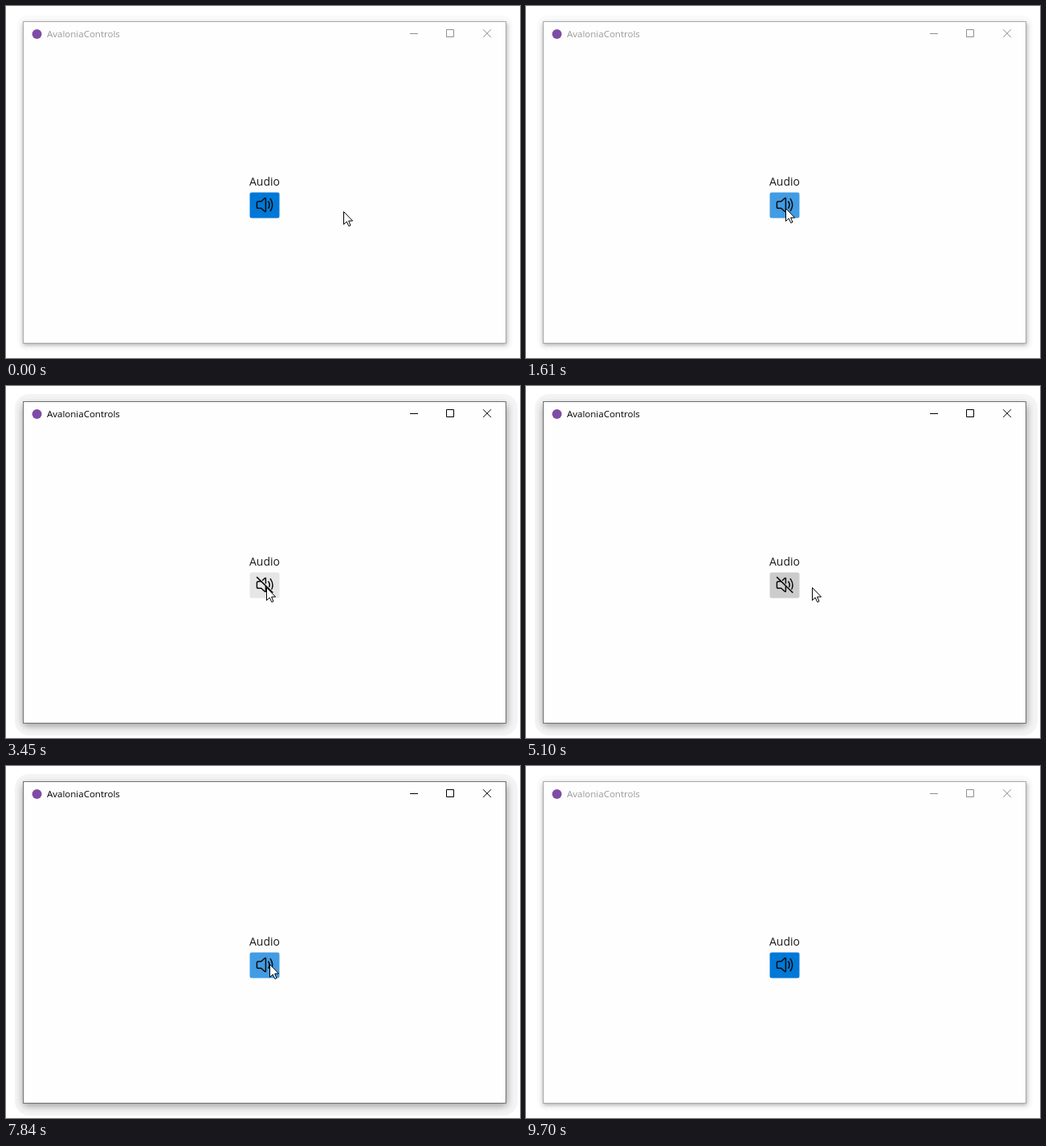
An HTML page that plays this animation: 640x439 px, repeating every 9810 ms.

```html
<!DOCTYPE html>
<html lang="en">
<head>
<meta charset="utf-8">
<title>AvaloniaControls</title>
<style>
  html, body { margin: 0; width: 100%; height: 100%; overflow: hidden; background: #fff; }
  svg { display: block; width: 100%; height: 100%; }
  text { font-family: "Open Sans", "Noto Sans", sans-serif; }
  .line { fill: none; stroke: #0a0a0a; stroke-width: 1.5; stroke-linecap: round; stroke-linejoin: round; }
</style>
</head>
<body>
<svg viewBox="0 0 640 439">
  <defs>
    <filter id="soft" x="-10%" y="-10%" width="120%" height="120%"><feGaussianBlur stdDeviation="2.5"/></filter>
    <filter id="deep" x="-10%" y="-10%" width="120%" height="120%"><feGaussianBlur stdDeviation="5"/></filter>
  </defs>
  <rect width="640" height="439" fill="#fff"/>

  <g id="idleShadow">
    <rect x="14" y="12" width="617" height="418" rx="12" fill="#fafafa"/>
    <rect x="21" y="21" width="603" height="402" rx="3" fill="#000" opacity=".3" filter="url(#soft)"/>
  </g>
  <g id="activeShadow">
    <rect x="11" y="10" width="626" height="426" rx="18" fill="#f4f4f4"/>
    <rect x="21" y="23" width="603" height="401" rx="4" fill="#000" opacity=".36" filter="url(#deep)"/>
  </g>
  <rect id="frame" x="21.5" y="19.5" width="601" height="401" fill="#fefefe"/>

  <circle cx="38.5" cy="35" r="6" fill="#7e4ca5"/>
  <text id="caption" x="51" y="39" font-size="11.5">AvaloniaControls</text>
  <path id="controls" fill="none" d="M503 34.5h10M548.5 29.5h9v9h-9zM594 29.2l10 10M604 29.2l-10 10"/>

  <text x="303" y="224" font-size="14" fill="#1c1c1c">Audio</text>
  <g id="button">
    <rect id="face" x="303.5" y="232.6" width="37" height="32" rx="2.5"/>
    <path id="iconOn" class="line" d="M323.4 240.4Q323.4 238.9 322.2 239.8L317.8 243.7H314.3Q312.4 243.7 312.4 245.6V250.4Q312.4 252.3 314.3 252.3H317.8L322.2 256.2Q323.4 257.1 323.4 255.6Z
      M326.8 244Q329.2 248 326.8 252M329.3 240.6Q334.2 248 329.3 255.4"/>
    <path id="iconOff" class="line" d="M319.6 242.2L322.2 239.8Q323.4 238.9 323.4 240.4V246
      M316.8 243.7H314.3Q312.4 243.7 312.4 245.6V250.4Q312.4 252.3 314.3 252.3H317.8L322.2 256.2Q323.4 257.1 323.4 255.6V249.6
      M326.8 244Q329.1 247.2 327.8 250.4M329.3 240.6Q333.8 247 330.9 253.2M312.6 238.6L331.8 257.4"/>
  </g>
  <path id="cursor" fill="#fff" stroke="#000" stroke-width="1"
    d="M.5 .5V16.4L4.2 12.9L6.8 18.5L9 17.6L6.6 12H11.6Z"/>
</svg>
<script>
const LOOP = 9810, PRESS_FADE = 75;
const ui = {};
document.querySelectorAll('svg [id]').forEach(el => ui[el.id] = el);

const smooth = p => p * p * (3 - 2 * p);
const rush = p => p * p;
const linear = p => p;

// Each pointer move advances in equal ticks, the first one at its start.
const moves = [
  { start: 620, end: 1610, ticks: 18, to: [323, 251.5], ease: smooth },
  { start: 3450, end: 3810, ticks: 6, to: [357, 251], ease: rush },
  { start: 5100, end: 5790, ticks: 12, to: [321, 247], ease: smooth },
  { start: 7840, end: 8130, ticks: 6, to: [362, 248], ease: linear },
  { start: 9010, end: 9490, ticks: 9, to: [597, 440], ease: smooth }
];
const presses = [[2470, 2650], [6590, 6710]];

function pointerAt(t) {
  let [x, y] = [420, 256];
  for (const m of moves) {
    if (t < m.start) break;
    const tick = (m.end - m.start) / (m.ticks - 1);
    const step = Math.floor((t - m.start) / tick + 1e-6) + 1;
    const p = m.ease(Math.min(1, step / m.ticks));
    x += (m.to[0] - x) * p;
    y += (m.to[1] - y) * p;
  }
  return [x, y];
}

const clamp = v => Math.max(0, Math.min(1, v));
const pressDepth = t => Math.max(...presses.map(([down, up]) =>
  Math.min(clamp((t - down) / PRESS_FADE), 1 - clamp((t - up) / PRESS_FADE))));

const show = (el, on) => el.setAttribute('visibility', on ? 'visible' : 'hidden');

function faceColor(checked, hover, pressed) {
  if (pressed) return '#999';
  if (checked) return hover ? '#429ce3' : '#0078d7';
  return hover ? '#e6e6e6' : '#ccc';
}

function render(t) {
  const active = t >= 2470 && t < 9700;
  show(ui.activeShadow, active);
  show(ui.idleShadow, !active);
  ui.frame.setAttribute('stroke', active ? '#707070' : '#aaa');
  ui.caption.setAttribute('fill', active ? '#000' : '#999');
  ui.controls.setAttribute('stroke', active ? '#000' : '#8f8f8f');

  const [x, y] = pointerAt(t);
  const hover = x >= 303 && x < 341 && y >= 232 && y < 265;
  const pressed = presses.some(([down, up]) => t >= down && t < up);
  const checked = t < presses[0][1] || t >= presses[1][1];
  ui.face.setAttribute('fill', faceColor(checked, hover, pressed));
  show(ui.iconOn, checked);
  show(ui.iconOff, !checked);

  const scale = 1 - 0.02 * pressDepth(t);
  ui.button.setAttribute('transform', `translate(322 248.6) scale(${scale}) translate(-322 -248.6)`);
  ui.cursor.setAttribute('transform', `translate(${Math.round(x)} ${Math.round(y)})`);
  show(ui.cursor, y < 439);
}

function loop() {
  render(performance.now() % LOOP);
  requestAnimationFrame(loop);
}
loop();
</script>
</body>
</html>
```
